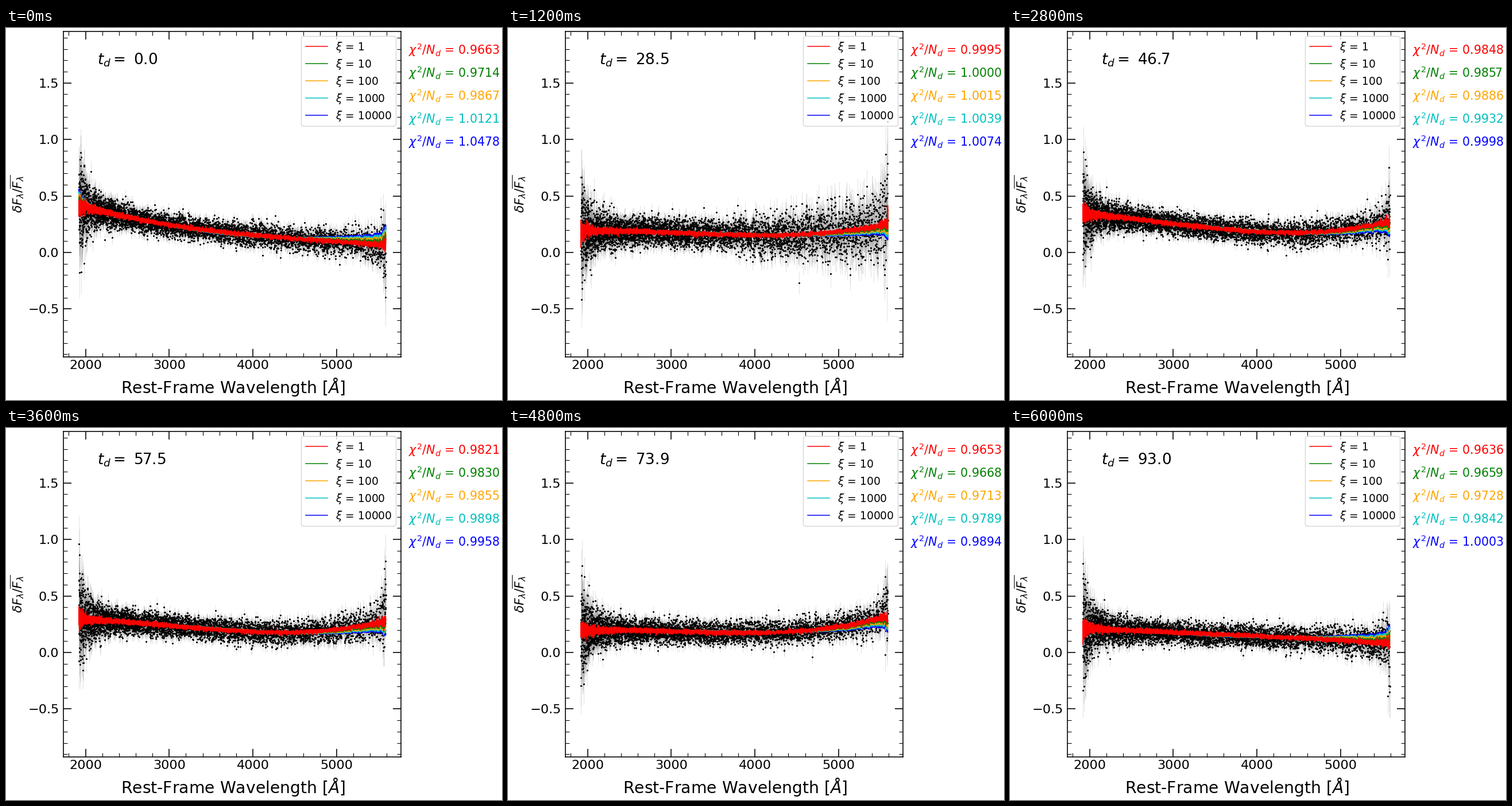
Animation of 864 by 648 pixels, one loop 6.2 s. Source, as a matplotlib script:

```python
import numpy as np
import matplotlib.pyplot as plt
from matplotlib.animation import FuncAnimation
from matplotlib.collections import LineCollection
from matplotlib.patches import FancyBboxPatch
from matplotlib.ticker import AutoMinorLocator, MultipleLocator

W, H = 864, 648
FRAMES, INTERVAL = 31, 200
COLORS = ["red", "green", "orange", "c", "b"]
SHARE = np.linspace(0, 1, len(COLORS))   # smoothing strength of each model
NOISY_STEP = 6                           # epoch with a poor red half

# Step, delay, flux at four anchor wavelengths, lowest and highest chi
ANCHORS = np.array([1920, 3000, 4300, 5588])
KEYS = np.array([
    [0, 0.0, 0.42, 0.245, 0.135, 0.065, 0.9663, 1.0478],
    [6, 28.5, 0.19, 0.175, 0.154, 0.25, 0.9995, 1.0074],
    [10, 33.3, 0.50, 0.345, 0.20, 0.15, 0.9732, 1.0324],
    [14, 46.7, 0.34, 0.255, 0.175, 0.28, 0.9848, 0.9998],
    [21, 65.6, 0.26, 0.225, 0.18, 0.28, 0.9801, 0.9928],
    [26, 79.5, 0.15, 0.16, 0.18, 0.35, 0.9555, 0.9871],
    [30, 93.0, 0.215, 0.178, 0.135, 0.08, 0.9636, 1.0003]])

# Log-spaced wavelength grid and its noise profile
wave = np.geomspace(ANCHORS[0], ANCHORS[-1], 4640)
blue, red = wave - wave[0], wave[-1] - wave
sigma = (0.048 + 0.07 * np.exp(-blue / 220) + 0.13 * np.exp(-blue / 60)
         + 0.04 * np.exp(-red / 250) + 0.17 * np.exp(-red / 28))
ramp = 0.012 + 0.055 * np.clip((wave - 3600) / 1200, 0, 1.4)

# Where the smoother models leave the first one
edge_l = 0.06 * np.exp(-blue / 150) + 0.07 * np.exp(-blue / 30)
edge_r = (0.09 * np.clip((wave - 4200) / 1388, 0, 1) ** 1.5
          + 0.06 * np.exp(-red / 50)
          + 0.006 * np.sin(wave / 17) * np.clip((wave - 5000) / 400, 0, 1))
bow = -0.016 * np.exp(-((wave - 3600) / 650) ** 2)


def unit(x):
    return (x - 3754) / 1834


def label(x, y, text, size, **kw):
    return fig.text(x / W, 1 - y / H, text, fontsize=size, **kw)


fig = plt.figure(figsize=(W / 72, H / 72), dpi=72, facecolor="white")
ax = fig.add_axes([100.4 / W, 1 - 572.6 / H, 587.6 / W, 566.4 / H])
ax.set_xlim(1738.5, 5769)
ax.set_ylim(-0.922, 1.954)
for axis, step in ((ax.xaxis, 1000), (ax.yaxis, 0.5)):
    axis.set_major_locator(MultipleLocator(step))
    axis.set_minor_locator(AutoMinorLocator(5))
ax.tick_params(which="both", direction="in", top=True, right=True)
ax.tick_params(which="major", length=14.4, width=1.6, labelsize=22.4)
ax.tick_params(which="minor", length=7.2, width=1.1)
ax.tick_params(axis="x", which="major", pad=5.7)
ax.tick_params(axis="y", which="major", pad=8)
for spine in ax.spines.values():
    spine.set_linewidth(1.6)

label(395.3, 635.5, r"Rest-Frame Wavelength [$\AA$]", 28.2, ha="center")
label(20, 289, r"$\delta F_{\lambda}/\overline{F_{\lambda}}$", 21.8,
      ha="center", va="center", rotation=90)
delay_text = label(159, 63, "", 26.2)
chi_texts = [label(701, 46 + 40 * k, "", 20.6, color=c)
             for k, c in enumerate(COLORS)]

bars = LineCollection([], colors="gray", alpha=0.28, linewidths=0.8, zorder=1)
ax.add_collection(bars, autolim=False)
dots, = ax.plot([], [], "o", color="black", ms=3.1, mew=0, zorder=2)
models = [ax.plot([], [], color=c, lw=1.7, zorder=4 - s)[0]
          for c, s in zip(COLORS, SHARE)]

# Legend, laid out in stage pixels
fig.add_artist(FancyBboxPatch(
    (514.5, H - 171), 165, 156.5, transform=None,
    boxstyle="round,pad=0,rounding_size=3.8", fc="white", ec="0.8",
    lw=1.4, alpha=0.8))
for k, c in enumerate(COLORS):
    y = 32 + 30 * k
    fig.add_artist(plt.Line2D([521.5 / W, 560 / W], [1 - y / H] * 2,
                              color=c, lw=1.5))
    label(573.5, y + 7, rf"$\xi$ = {10 ** k}", 18.7)


def update(i):
    rng = np.random.default_rng(700 + i)
    delay, *flux_keys, chi_lo, chi_hi = [
        np.interp(i, KEYS[:, 0], col) for col in KEYS.T[1:]]
    base = np.polyval(np.polyfit(unit(ANCHORS), flux_keys, 3), unit(wave))

    # Smoother models overshoot a steep blue end and flatten the red end
    left = 8 * (flux_keys[0] - flux_keys[1]) - 0.4
    right = np.clip((flux_keys[2] - flux_keys[3]) / 0.06, -0.8, 1)
    drift = left * edge_l + right * (edge_r + bow)

    poor = 0.1 + 0.9 * np.exp(-((i - NOISY_STEP) / 1.5) ** 2)
    err = sigma + poor * ramp
    flux = (base - 0.2 * right * np.exp(-red / 25)
            + err * rng.normal(size=wave.size))
    bars.set_segments(np.stack([np.column_stack([wave, flux - err]),
                                np.column_stack([wave, flux + err])], axis=1))
    dots.set_data(wave, flux)

    jitter = 0.2 * sigma * rng.normal(size=wave.size)
    for line, s in zip(models, SHARE):
        line.set_data(wave, base + s * drift + (1 - 0.6 * s) * jitter)

    delay_text.set_text(rf"$t_d =$ {delay:.1f}")
    for text, s in zip(chi_texts, SHARE):
        chi = chi_lo + (chi_hi - chi_lo) * s ** 2
        text.set_text(rf"$\chi^2/N_d$ = {chi:.4f}")
    return [bars, dots, *models, delay_text, *chi_texts]


anim = FuncAnimation(fig, update, frames=FRAMES, interval=INTERVAL,
                     repeat=True, repeat_delay=0, blit=False)
plt.show()
```
